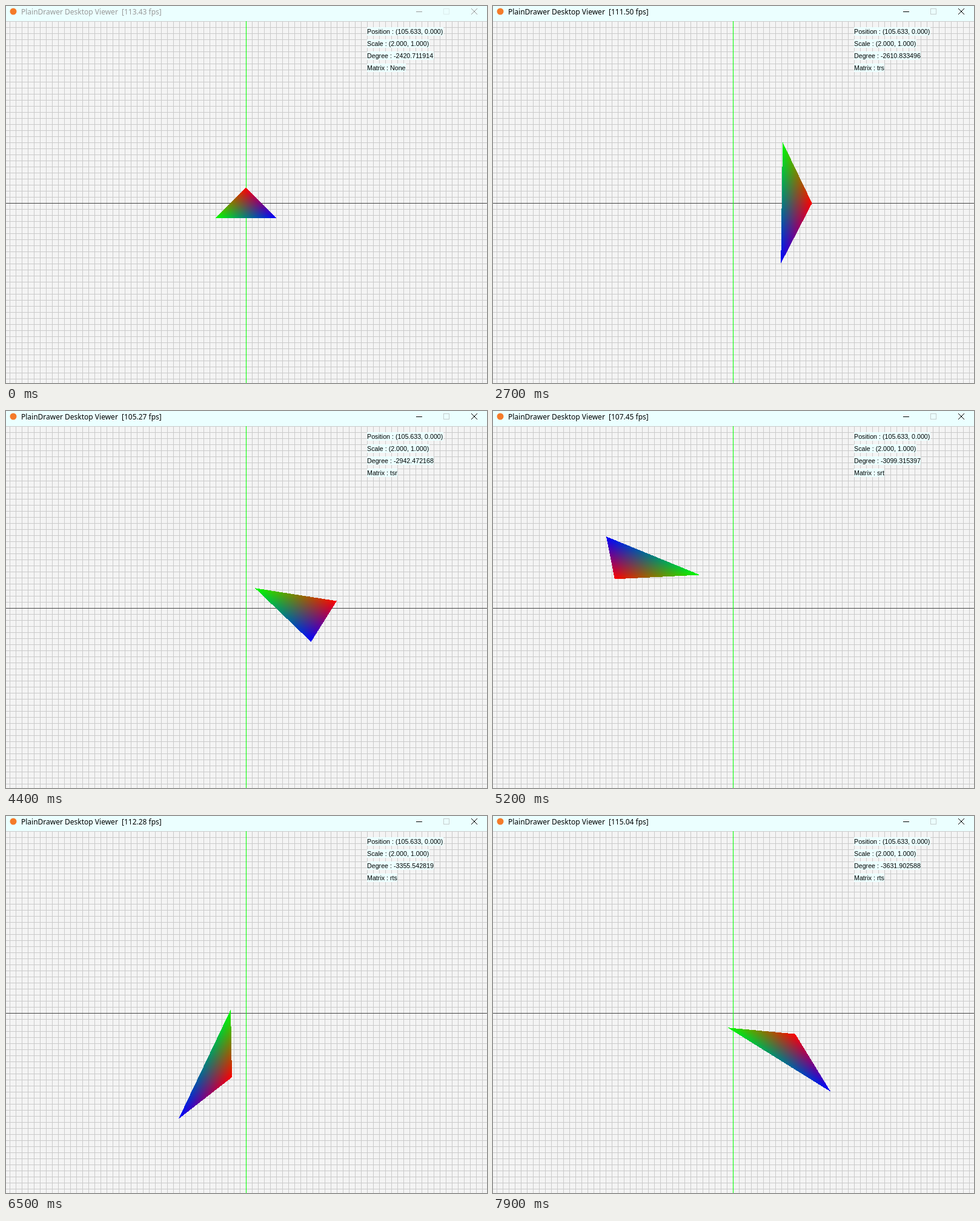
These frames come from a looping animation (794 by 622 pixels, 8000 ms). An HTML page with a canvas:

```html
<!DOCTYPE html>
<html lang="en">
<head>
<meta charset="utf-8">
<title>Triangle transform</title>
<style>
  html, body { margin: 0; width: 100%; height: 100%; overflow: hidden; }
  canvas { display: block; }
</style>
</head>
<body>
<canvas id="stage" width="794" height="622"></canvas>
<script>
const ctx = document.getElementById('stage').getContext('2d');
const W = 794, H = 622, BAR = 25, CX = 396, CY = 325;
const LOOP = 8000, STEP = 100, PALE = '#ebffff';
const POS_X = 105.633, SCALE_X = 2;
const VERTICES = [[0, 25], [-50, -25], [50, -25]]; // red, green, blue

const FPS = [113.43, 104.62, 106.18, 112.87, 98.27, 115.36, 111.5, 114.09, 108.74,
  105.27, 102.91, 107.45, 111.83, 115.15, 112.28, 109.66, 103.91, 115.04];
const ORDERS = [[0, 'None'], [1000, 'trs'], [3000, 'tsr'], [4600, 'srt'], [6300, 'rts']];
const DEGREES = [[0, -2420.711914], [1700, -2420.711914], [1800, -2433.438232],
  [2700, -2610.833496], [4400, -2942.472168], [5900, -3236.553223],
  [7200, -3494.364014], [7900, -3631.902588]];

function degreeAt(t) {
  const i = DEGREES.findIndex(([time]) => time >= t);
  if (i <= 0) return DEGREES[0][1];
  const [t0, d0] = DEGREES[i - 1], [t1, d1] = DEGREES[i];
  return d0 + (d1 - d0) * (t - t0) / (t1 - t0);
}

// The rightmost letter of the order acts on the vertex first.
function transform(vertex, order, degree) {
  const a = degree * Math.PI / 180, cos = Math.cos(a), sin = Math.sin(a);
  const ops = {
    t: ([x, y]) => [x + POS_X, y],
    r: ([x, y]) => [x * cos - y * sin, x * sin + y * cos],
    s: ([x, y]) => [x * SCALE_X, y]
  };
  const letters = order === 'None' ? [] : [...order].reverse();
  const [x, y] = letters.reduce((p, op) => ops[op](p), vertex);
  return [CX + x, CY - y];
}

function rect(color, x, y, w, h) {
  ctx.fillStyle = color;
  ctx.fillRect(x, y, w, h);
}

function text(str, x, y, color) {
  ctx.fillStyle = color;
  ctx.fillText(str, x, y);
}

function drawGrid() {
  rect('#f4f4f4', 0, BAR, W, H - BAR);
  for (let x = CX % 10; x < W; x += 10) rect('#cacaca', x, BAR, 1, H);
  for (let y = BAR; y < H; y += 10) rect('#cacaca', 0, y, W, 1);
  rect('#444', 0, CY, W, 1);
  rect('#0f0', CX, BAR, 1, H);
}

// Hard-edged triangle with barycentric colour blending.
function drawTriangle([a, b, c]) {
  const cross = (p, q, x, y) => (q[0] - p[0]) * (y - p[1]) - (q[1] - p[1]) * (x - p[0]);
  const area = cross(a, b, c[0], c[1]);
  const xs = [a[0], b[0], c[0]], ys = [a[1], b[1], c[1]];
  for (let y = Math.floor(Math.min(...ys)); y <= Math.max(...ys); y++) {
    for (let x = Math.floor(Math.min(...xs)); x <= Math.max(...xs); x++) {
      const px = x + 0.5, py = y + 0.5;
      const weights = [cross(b, c, px, py), cross(c, a, px, py), cross(a, b, px, py)]
        .map(v => v / area);
      if (weights.every(w => w >= 0)) {
        rect(`rgb(${weights.map(w => Math.round(w * 255))})`, x, y, 1, 1);
      }
    }
  }
}

function drawInfo(order, degree) {
  ctx.font = '10.7px "Liberation Sans", Arial, sans-serif';
  [
    `Position : (${POS_X.toFixed(3)}, 0.000)`,
    `Scale : (${SCALE_X.toFixed(3)}, 1.000)`,
    `Degree : ${degree.toFixed(6)}`,
    `Matrix : ${order}`
  ].forEach((line, i) => {
    const y = 46 + i * 20;
    rect(PALE, 596, y - 11, Math.ceil(ctx.measureText(line).width), 14);
    text(line, 596, y, '#000');
  });
}

function drawTitleBar(t) {
  const active = t >= 200, ink = active ? '#000' : '#999';
  rect(PALE, 0, 0, W, BAR);
  ctx.fillStyle = '#f47b2a';
  ctx.beginPath();
  ctx.arc(12, 9, 5.5, 0, Math.PI * 2);
  ctx.fill();

  ctx.font = '12px "Noto Sans", sans-serif';
  text('PlainDrawer Desktop Viewer', 25, 14, ink);
  text(`[${FPS[Math.floor((t + 50) / 450)].toFixed(2)} fps]`, 191, 14, ink);

  rect(ink, 677, 9, 10, 1);
  ctx.lineWidth = 1;
  ctx.strokeStyle = active ? '#c4cccc' : '#dcecec';
  ctx.strokeRect(722.5, 4.5, 9, 9);
  ctx.strokeStyle = ink;
  ctx.beginPath();
  ctx.moveTo(768, 4);
  ctx.lineTo(778, 14);
  ctx.moveTo(778, 4);
  ctx.lineTo(768, 14);
  ctx.stroke();
}

function draw(t) {
  const order = ORDERS.filter(([start]) => start <= t).pop()[1];
  const degree = degreeAt(t);
  drawGrid();
  drawTriangle(VERTICES.map(v => transform(v, order, degree)));
  drawInfo(order, degree);
  drawTitleBar(t);
}

let shown = -1;
function tick() {
  const t = Math.floor(performance.now() % LOOP / STEP) * STEP;
  if (t !== shown) draw(shown = t);
  requestAnimationFrame(tick);
}
tick();
</script>
</body>
</html>
```
